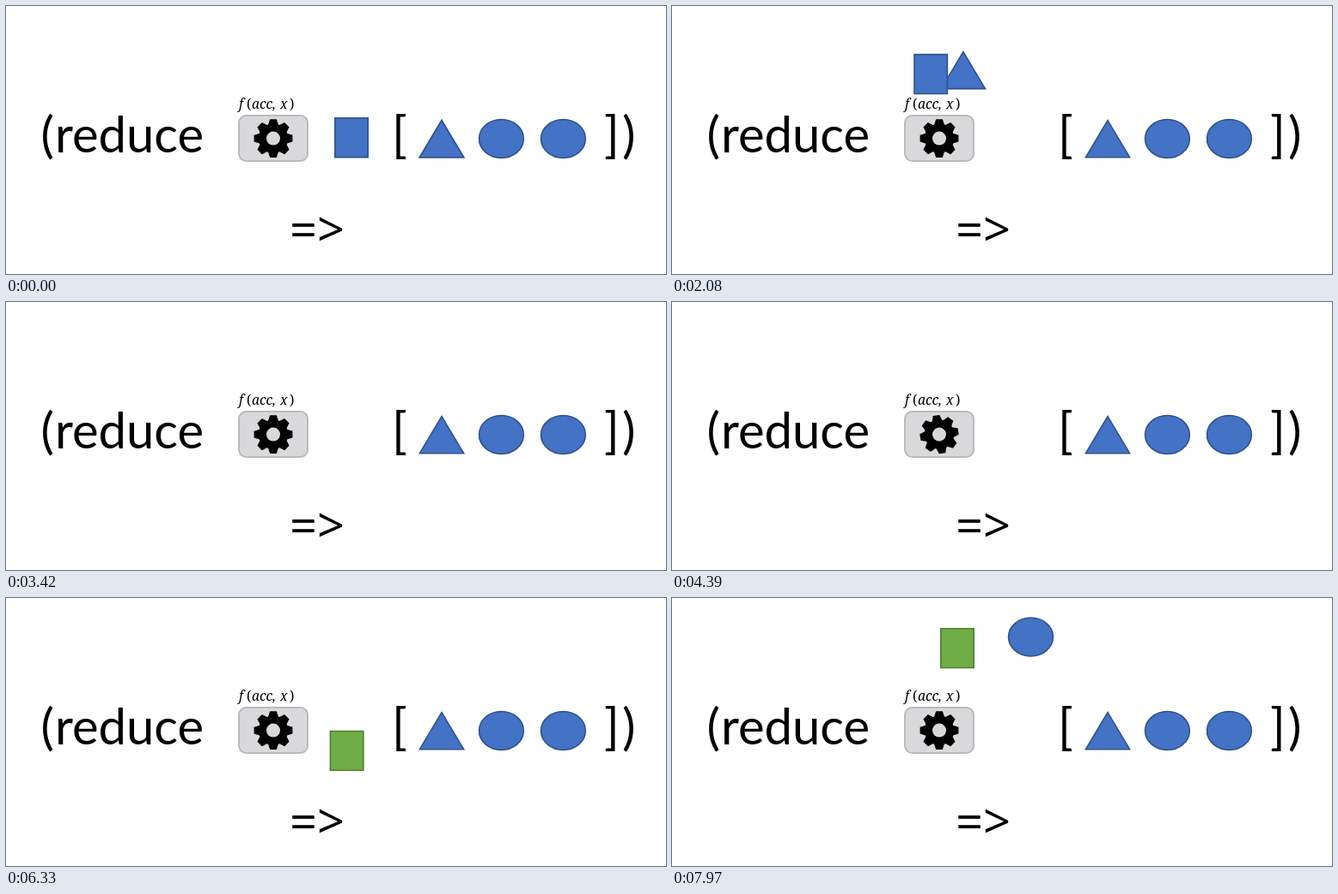
Animation, 768 px wide and 313 px high, one loop 8000 ms. Source, as an HTML page with a canvas:

```html
<!DOCTYPE html>
<html lang="en">
<head>
<meta charset="utf-8">
<title>reduce</title>
<style>
  html, body { margin: 0; width: 100%; height: 100%; overflow: hidden; background: #fff; }
  canvas { display: block; }
</style>
</head>
<body>
<canvas id="stage" width="768" height="313"></canvas>
<script>
const ctx = document.getElementById('stage').getContext('2d');
const LOOP = 8000;
const STEP = 51;
const BLUE = ['#4472c4', '#2f528f'];
const GREEN = ['#70ad47', '#507e32'];
const GREY = '#d9d9db';
const HOME = [0, 0];

// The throw into the machine, one key every five steps:
// share of the distance, extra sway to the left, share of the height.
const THROW = {
  share: [0, 0, 0, 0.178, 0.511, 0.74, 0.88, 1],
  sway: [0, 0, 0, -11, 23.5, 46, 24, 0],
  rise: [0, 0.07, 0.18, 0.73, 0.96, 0.56, 0.18, 0.02]
};

// Number of steps taken at time t by a move of n steps.
function stepsAt(t, start, n) {
  const k = Math.floor((t + 12 - start) / STEP) + 1;
  return Math.max(0, Math.min(n, k));
}

// Smooth curve through evenly spaced values.
function spline(values, pos) {
  const last = values.length - 1;
  const i = Math.max(0, Math.min(last - 1, Math.floor(pos)));
  const u = Math.max(0, Math.min(1, pos - i));
  const [p, a, b, n] = [i - 1, i, i + 1, i + 2].map(j => values[Math.max(0, Math.min(last, j))]);
  const m0 = (b - p) / 2, m1 = (n - a) / 2;
  return a + u * (m0 + u * (3 * (b - a) - 2 * m0 - m1 + u * (2 * (a - b) + m0 + m1)));
}

function bezier(a, b, c, d, u) {
  const v = 1 - u;
  return v * v * v * a + 3 * v * v * u * b + 3 * v * u * u * c + u * u * u * d;
}

const smooth = u => u * u * (3 - 2 * u);

function thrown(k, distance, height) {
  const at = name => spline(THROW[name], (k - 1) / 5);
  return [-distance * at('share') - at('sway'), -height * at('rise')];
}

// The result drops out of the machine and swings up into the free place.
function returned(k) {
  const u = smooth(Math.min(1, k / 32));
  return [bezier(-90, -91, 26, 0, u), bezier(2, 117, 13, 0, u)];
}

function paint([fill, line], width = 1.6) {
  ctx.fillStyle = fill;
  ctx.strokeStyle = line;
  ctx.lineWidth = width;
  ctx.fill();
  ctx.stroke();
}

function square([dx, dy], colors) {
  ctx.beginPath();
  ctx.rect(382.8 + dx, 130.8 + dy, 38.4, 45.8);
  paint(colors);
}

function triangle([dx, dy]) {
  ctx.beginPath();
  ctx.moveTo(507 + dx, 133.6 + dy);
  ctx.lineTo(532.6 + dx, 176.7 + dy);
  ctx.lineTo(481.4 + dx, 176.7 + dy);
  ctx.closePath();
  paint(BLUE);
}

function circle([dx, dy]) {
  ctx.beginPath();
  ctx.ellipse(576.4 + dx, 155 + dy, 25.9, 22.5, 0, 0, 2 * Math.PI);
  paint(BLUE);
}

function gear(angle) {
  ctx.save();
  ctx.translate(311, 154.6);
  ctx.rotate(angle);
  ctx.fillStyle = '#000';
  ctx.beginPath();
  ctx.arc(0, 0, 17.2, 0, 2 * Math.PI);
  ctx.fill();
  for (let i = 0; i < 8; i++) {
    ctx.beginPath();
    ctx.moveTo(-6.2, -15);
    ctx.lineTo(-3.8, -22.4);
    ctx.lineTo(3.8, -22.4);
    ctx.lineTo(6.2, -15);
    ctx.fill();
    ctx.rotate(Math.PI / 4);
  }
  ctx.fillStyle = GREY;
  ctx.beginPath();
  ctx.arc(0, 0, 8, 0, 2 * Math.PI);
  ctx.fill();
  ctx.restore();
}

function machine(angle) {
  ctx.beginPath();
  ctx.roundRect(271, 128, 80, 53, 8.5);
  paint([GREY, '#bbbbbd'], 2);
  gear(angle);
}

// Text placed by the left edge of its ink and its baseline.
function put(text, left, base, font) {
  ctx.font = font;
  ctx.fillText(text, left + ctx.measureText(text).actualBoundingBoxLeft, base);
}

function texts() {
  const code = '58px Lato, Calibri, sans-serif';
  const upright = '15.5px "Noto Serif", Cambria, serif';
  const italic = 'italic ' + upright;
  ctx.fillStyle = '#000';
  put('(', 42.5, 170.5, code);
  put('reduce', 61, 170.5, code);
  put('[', 454, 170.5, code);
  put(']', 697, 170.5, code);
  put(')', 718, 170.5, code);
  put('=>', 333, 281, '56px "Open Sans", sans-serif');
  put('f', 268, 120, italic);
  put('(', 280, 120, upright);
  put('acc,', 286, 120, italic);
  put('x', 318, 120, italic);
  put(')', 330, 120, upright);
}

function draw(t) {
  ctx.fillStyle = '#fff';
  ctx.fillRect(0, 0, 768, 313);

  triangle(HOME);
  circle(HOME);
  circle([72, 0]);

  if (t < 2900) {
    const k = stepsAt(t, 910, 36);
    triangle(thrown(k, 193, 107));
    square(thrown(k, 91, 99), BLUE);
  } else if (t >= 6938) {
    const k = stepsAt(t, 6950, 36);
    circle(thrown(k, 265, 114));
    square(thrown(k, 91, 99), GREEN);
  } else if (t >= 5298) {
    square(returned(stepsAt(t, 5310, 32)), GREEN);
  }

  const turn = Math.max(0, stepsAt(t, 2920, 41) - 1) / 40;
  machine(turn * 2 * Math.PI);
  texts();
}

function frame() {
  draw(performance.now() % LOOP);
  requestAnimationFrame(frame);
}
frame();
</script>
</body>
</html>
```
